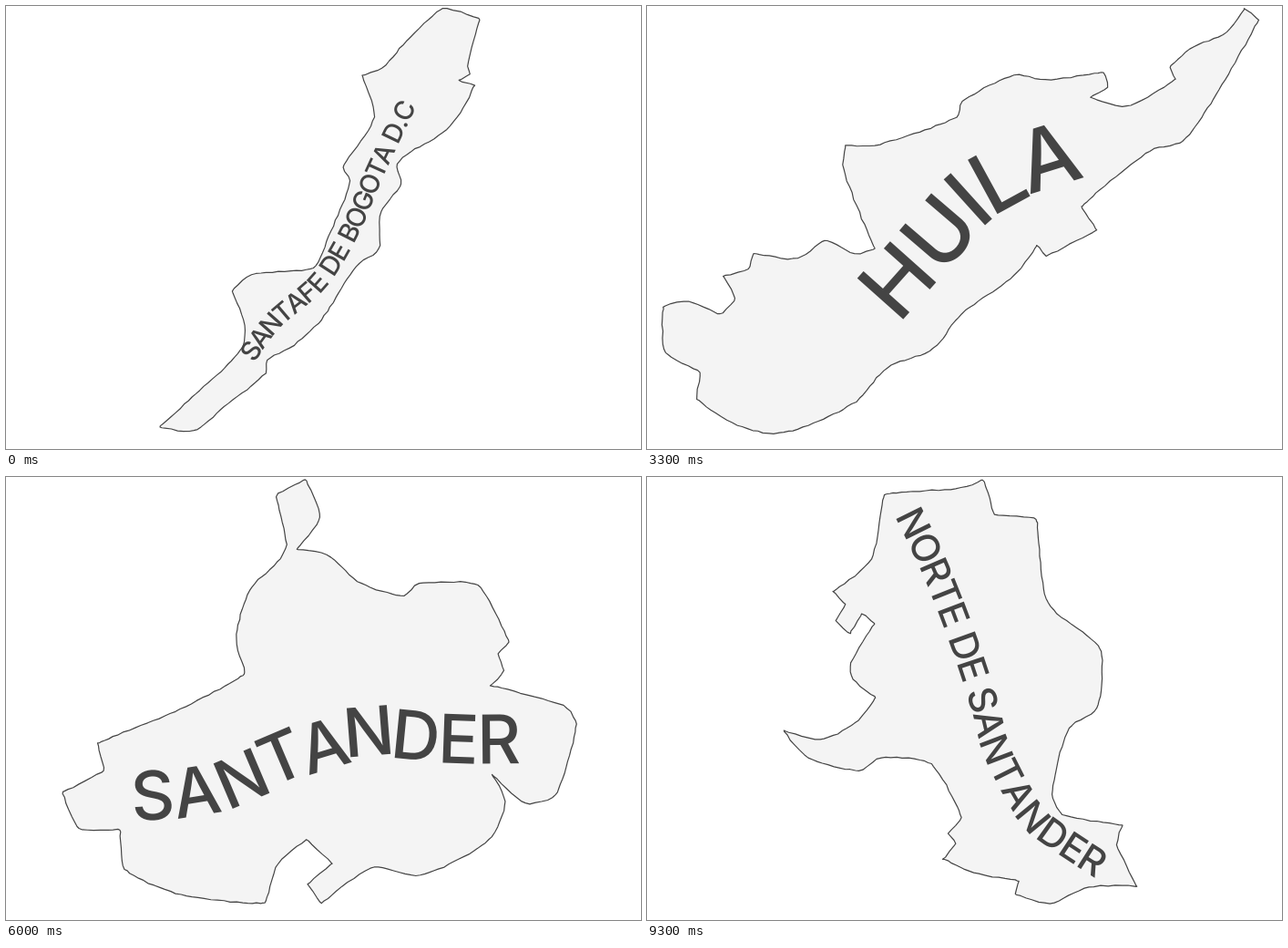
An HTML page with a canvas for the animation above (9800 ms loop, 697x486 px).

```html
<!DOCTYPE html>
<html lang="es">
<head>
<meta charset="utf-8">
<title>Departamentos</title>
<style>
html, body { margin: 0; width: 100%; height: 100%; overflow: hidden; background: #fff; }
canvas { display: block; }
</style>
</head>
<body>
<canvas id="stage" width="697" height="486"></canvas>
<script>
const LOOP = 9800;
const INK = '#444';
const FILL = '#f4f4f4';
const ctx = document.getElementById('stage').getContext('2d');

// "edge" holds the main corners of a border, "line" the middle line of a label.
const maps = [
  {
    from: 0, text: 'SANTAFE DE BOGOTA D.C', size: 29,
    edge: `480,3 520,14 507,66 509,75 497,82 514,87 502,112 479,139 435,166 429,177 434,195
      412,226 409,267 384,286 346,344 316,372 287,388 285,403 244,436 206,466 169,462 200,433
      257,378 262,350 249,313 269,295 337,287 359,241 378,192 370,177 404,122 391,76 413,68 440,38`,
    line: '264,385 293,346 343,302 376,249 406,179 441,106'
  },
  {
    from: 1800, text: 'HUILA', size: 93,
    edge: `656,3 671,15 628,92 588,148 552,159 477,220 494,246 438,274 428,262 403,296 345,338
      314,376 264,397 225,437 150,468 105,462 55,431 58,402 20,380 18,330 46,324 80,338 97,321
      84,296 111,289 117,272 165,277 195,257 228,272 250,266 216,180 218,153 250,153 340,122
      346,105 403,76 437,81 501,73 506,89 487,100 527,110 580,80 574,68 596,47 636,29`,
    line: '250,327 273,302 319,249 352,212 384,190 440,165 473,158'
  },
  {
    from: 4600, text: 'SANTANDER', size: 74, startSize: 67,
    edge: `329,3 345,44 319,79 352,85 390,117 437,130 453,117 518,119 552,181 540,194 546,212
      532,229 612,251 626,271 603,349 570,358 534,327 548,356 530,398 455,437 404,428 346,468
      331,447 358,424 330,398 299,424 284,467 192,458 130,430 125,387 80,386 62,346 107,322
      101,292 186,257 262,216 253,178 267,125 301,90 308,74 297,20`,
    startLine: '163,346 228,342 307,303 342,288 366,250 358,206 340,165 324,105',
    line: '138,350 211,344 262,329 303,306 349,294 394,279 446,283 495,287 564,287'
  },
  {
    from: 6100, text: 'RISARALDA', size: 68,
    edge: `281,3 377,7 357,64 429,65 486,67 498,95 525,100 490,134 460,138 408,118 377,118 386,163
      355,206 302,202 296,243 313,290 328,298 324,311 395,317 376,296 422,256 439,300 489,320
      491,302 517,316 618,339 687,400 674,456 612,468 548,454 332,421 326,396 280,401 270,377
      288,343 245,345 240,322 210,301 190,271 121,275 72,236 60,187 2,118 7,94 50,78 160,37 196,16`,
    line: '213,189 238,232 270,298 304,329 330,353 370,359 410,363 471,386'
  },
  {
    from: 7400, text: 'QUINDIO', size: 76,
    edge: `233,3 296,18 438,38 502,53 592,32 609,41 606,54 640,82 518,136 455,153 406,197 358,248
      334,293 324,332 321,342 231,440 206,465 171,468 138,453 120,414 101,347 112,280 73,224
      76,150 48,90 55,68 229,68 236,37`,
    line: '207,302 245,217 301,160 349,134 389,119 457,100'
  },
  {
    from: 8800, text: 'NORTE DE SANTANDER', size: 42,
    edge: `369,3 376,23 382,41 427,46 440,138 497,188 494,254 463,276 445,348 456,370 522,382
      516,403 538,449 485,450 442,468 404,457 408,443 359,434 325,419 339,402 331,391 345,373
      312,315 257,308 233,322 177,308 150,278 190,288 228,270 251,242 226,222 224,204 250,160
      236,150 223,172 207,158 218,140 204,126 246,90 261,20 345,12`,
    line: '286,37 318,104 350,187 370,248 385,302 422,370 444,390 500,427'
  }
];

const mix = (a, b, k) => a + (b - a) * k;
const parse = text => text.trim().split(/\s+/).map(p => p.split(',').map(Number));
const dist = (a, b) => Math.hypot(b[0] - a[0], b[1] - a[1]);

function seeded(seed) {
  return () => (seed = (seed * 16807) % 2147483647) / 2147483647;
}

// Handle at b: smooth on gentle bends, none at sharp corners.
function handle(a, b, c) {
  const ab = dist(a, b), bc = dist(b, c), ac = dist(a, c);
  if (!ab || !bc || !ac) return [0, 0];
  const bend = ((b[0] - a[0]) * (c[0] - b[0]) + (b[1] - a[1]) * (c[1] - b[1])) / (ab * bc);
  const k = Math.max(0, bend) / 3 / ac;
  return [(c[0] - a[0]) * k, (c[1] - a[1]) * k];
}

// Samples a curve through the key points, one point every few pixels.
function curve(keys, closed, step) {
  const n = keys.length;
  const at = i => closed ? keys[(i + n) % n] : keys[Math.max(0, Math.min(n - 1, i))];
  const out = [];
  for (let i = 0; i < (closed ? n : n - 1); i++) {
    const a = at(i), b = at(i + 1), len = dist(a, b);
    const ha = handle(at(i - 1), a, b), hb = handle(a, b, at(i + 2));
    const parts = Math.ceil(len / step);
    for (let j = 0; j < parts; j++) {
      const t = j / parts, u = 1 - t;
      out.push([0, 1].map(d => u * u * u * a[d] + 3 * u * u * t * (a[d] + ha[d] * len)
        + 3 * u * t * t * (b[d] - hb[d] * len) + t * t * t * b[d]));
    }
  }
  if (!closed) out.push(keys[n - 1]);
  return out;
}

function border(edge, seed) {
  const rnd = seeded(seed);
  const path = new Path2D();
  curve(parse(edge), true, 6).forEach(([x, y]) =>
    path.lineTo(x + rnd() * 1.2 - 0.6, y + rnd() * 1.2 - 0.6));
  path.closePath();
  return path;
}

function setFont(size) {
  ctx.font = `500 ${size}px Inter, "Liberation Sans", sans-serif`;
}

// Spreads the letters by their widths over the whole line.
function layout(text, line) {
  const pts = curve(parse(line), false, 2);
  const sums = [0];
  for (let i = 1; i < pts.length; i++) sums.push(sums[i - 1] + dist(pts[i - 1], pts[i]));
  const point = s => {
    let i = 1;
    while (i < pts.length - 1 && sums[i] < s) i++;
    const k = (s - sums[i - 1]) / (sums[i] - sums[i - 1]);
    return [0, 1].map(d => mix(pts[i - 1][d], pts[i][d], k));
  };
  setFont(100);
  const widths = [...text].map(c => ctx.measureText(c).width);
  const scale = sums[sums.length - 1] / widths.reduce((a, b) => a + b);
  let s = 0;
  return widths.map(w => {
    const mid = s + w * scale / 2, reach = w * scale / 3;
    const a = point(mid - reach), b = point(mid + reach);
    s += w * scale;
    return [...point(mid), Math.atan2(b[1] - a[1], b[0] - a[0])];
  });
}

maps.forEach((map, i) => {
  map.path = border(map.edge, 77 + i);
  map.end = layout(map.text, map.line);
  map.start = map.startLine ? layout(map.text, map.startLine) : map.end;
});

function drawLetter(char, x, y, angle, size) {
  ctx.save();
  ctx.translate(x, y);
  ctx.rotate(angle);
  ctx.fillText(char, 0, size * 0.364);
  ctx.restore();
}

function drawMap(map, age) {
  ctx.fillStyle = FILL;
  ctx.fill(map.path);
  ctx.strokeStyle = INK;
  ctx.lineWidth = 1.2;
  ctx.lineJoin = 'round';
  ctx.stroke(map.path);

  // A label settles in four hard steps of 100 ms.
  const k = Math.min(Math.floor(age / 100) / 4, 1);
  const size = mix(map.startSize || map.size, map.size, k);
  ctx.fillStyle = INK;
  ctx.textAlign = 'center';
  setFont(size);
  map.end.forEach((end, i) => {
    const [x, y, angle] = end.map((v, j) => mix(map.start[i][j], v, k));
    drawLetter(map.text[i], x, y, angle, size);
  });
}

function frame(now) {
  const t = now % LOOP;
  const map = maps.filter(m => m.from <= t).pop() || maps[0];
  ctx.fillStyle = '#fff';
  ctx.fillRect(0, 0, 697, 486);
  drawMap(map, t - map.from);
}

const t0 = performance.now();
function tick() {
  frame(Math.max(0, performance.now() - t0));
  requestAnimationFrame(tick);
}
tick();
</script>
</body>
</html>
```
